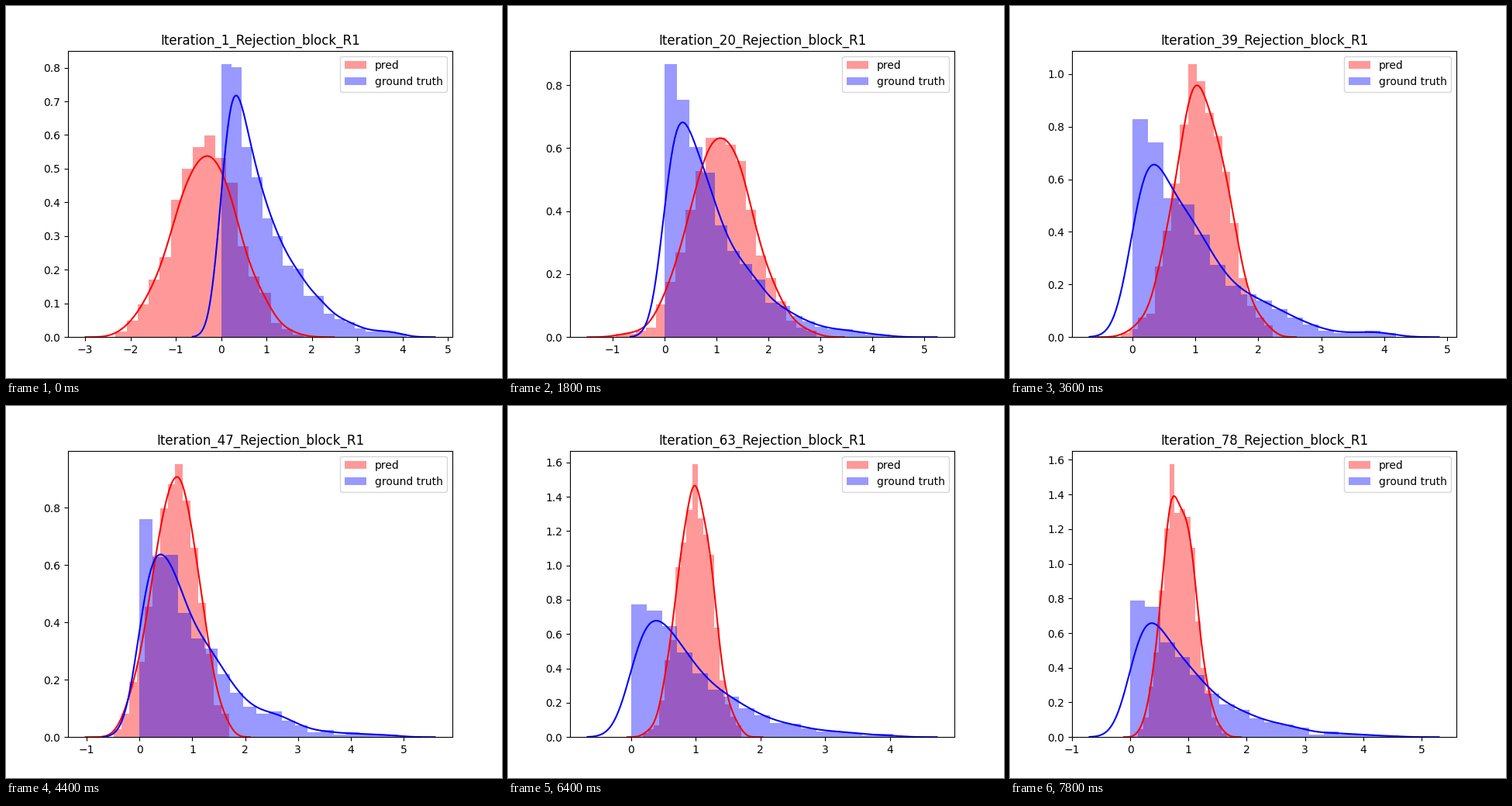
A matplotlib script for the animation above (8 s loop, 640x480 px).

```python
import numpy as np
import matplotlib.pyplot as plt
from matplotlib.animation import FuncAnimation

FRAMES, STEP = 40, 200
N = 500                               # samples per histogram
BIN = 2 * 1.349 / N ** (1 / 3)        # bin width per unit of spread
SMOOTH = 1.059 * N ** -0.2            # kernel width per unit of spread

# Key points, interpolated linearly over the frames
AT = [0, 9, 15, 22, 28, 30, 35, 37, 39]
TRACKS = dict(
    number=[1, 20, 33, 47, 56, 59, 68, 73, 78],
    pred_mean=[-.35, 1.1, 1.4, .68, 1.55, 1.27, .57, .75, .83],
    pred_spread=[.721, .59, .39, .43, .208, .25, .28, .215, .265],
    pred_lo=[-2.33, -.945, .157, -.63, .83, .5, -.298, .05, .133],
    pred_hi=[1.828, 2.92, 2.627, 1.693, 2.014, 2.03, 1.433, 1.4, 1.66],
    pred_top=[.599, .633, 1.101, .952, 1.891, 1.65, 1.497, 1.82, 1.574],
    truth_spread=[.684, .715, .732, .755, .738, .735, .732, .75, .765],
    truth_hi=[4.09, 4.593, 3.655, 4.9, 4.295, 4.2, 3.83, 4.2, 4.6],
    truth_top=[.81, .866, .882, .76, .88, .8, .737, .75, .79],
)


def normal(x, mean, std):
    return np.exp(-((x - mean) / std) ** 2 / 2) / (std * np.sqrt(2 * np.pi))


def weibull(x, shape, scale):
    z = x / scale
    return shape / scale * z ** (shape - 1) * np.exp(-z ** shape)


def histogram(pdf, lo, hi, spread, top, rng):
    """Bars of a finite sample of pdf whose highest bar reaches top."""
    bins = int(np.ceil((hi - lo) / (BIN * spread)))
    edges = np.linspace(lo, hi, bins + 1)
    width = (hi - lo) / bins
    counts = N * width * pdf((edges[:-1] + edges[1:]) / 2)
    counts += 0.5 * np.sqrt(counts) * rng.normal(size=bins)
    bars = np.clip(np.round(counts) / (N * width), 0, top)
    bars[bars.argmax()] = top
    return edges, bars


def density(edges, bars, spread):
    """Smooth the bars with a normal kernel, three widths past each end."""
    bw = SMOOTH * spread
    x = np.linspace(edges[0] - 3 * bw, edges[-1] + 3 * bw, 160)
    sub = (np.arange(12) + 0.5) / 12 * (edges[1] - edges[0])
    points = (edges[:-1, None] + sub).ravel()
    weights = np.repeat(bars / bars.sum() / 12, 12)
    return x, normal(x[:, None], points, bw) @ weights


fig, ax = plt.subplots(figsize=(6.4, 4.8), dpi=100)


def plot_dist(edges, bars, spread, color, label):
    ax.bar(edges[:-1], bars, np.diff(edges), align="edge",
           color=color, alpha=0.4, label=label)
    x, y = density(edges, bars, spread)
    ax.plot(x, y, color=color, lw=1.5)
    return max(bars.max(), y.max())


def draw(i):
    ax.clear()
    rng = np.random.default_rng(100 + i)
    v = {name: np.interp(i, AT, keys) for name, keys in TRACKS.items()}

    spread = v["pred_spread"]
    pred = histogram(lambda x: normal(x, v["pred_mean"], spread),
                     v["pred_lo"], v["pred_hi"], spread, v["pred_top"], rng)
    top = plot_dist(*pred, spread, "red", "pred")

    spread = v["truth_spread"]
    truth = histogram(lambda x: weibull(x, 1.1, 1.32 * spread),
                      0, v["truth_hi"], spread, v["truth_top"], rng)
    top = max(top, plot_dist(*truth, spread, "blue", "ground truth"))

    ax.set_ylim(0, top * 1.05)
    ax.set_title(f"Iteration_{round(v['number'])}_Rejection_block_R1")
    ax.legend(loc="upper right")
    return []


anim = FuncAnimation(fig, draw, frames=FRAMES, interval=STEP,
                     init_func=lambda: draw(0), repeat=True, repeat_delay=0)
plt.show()
```
